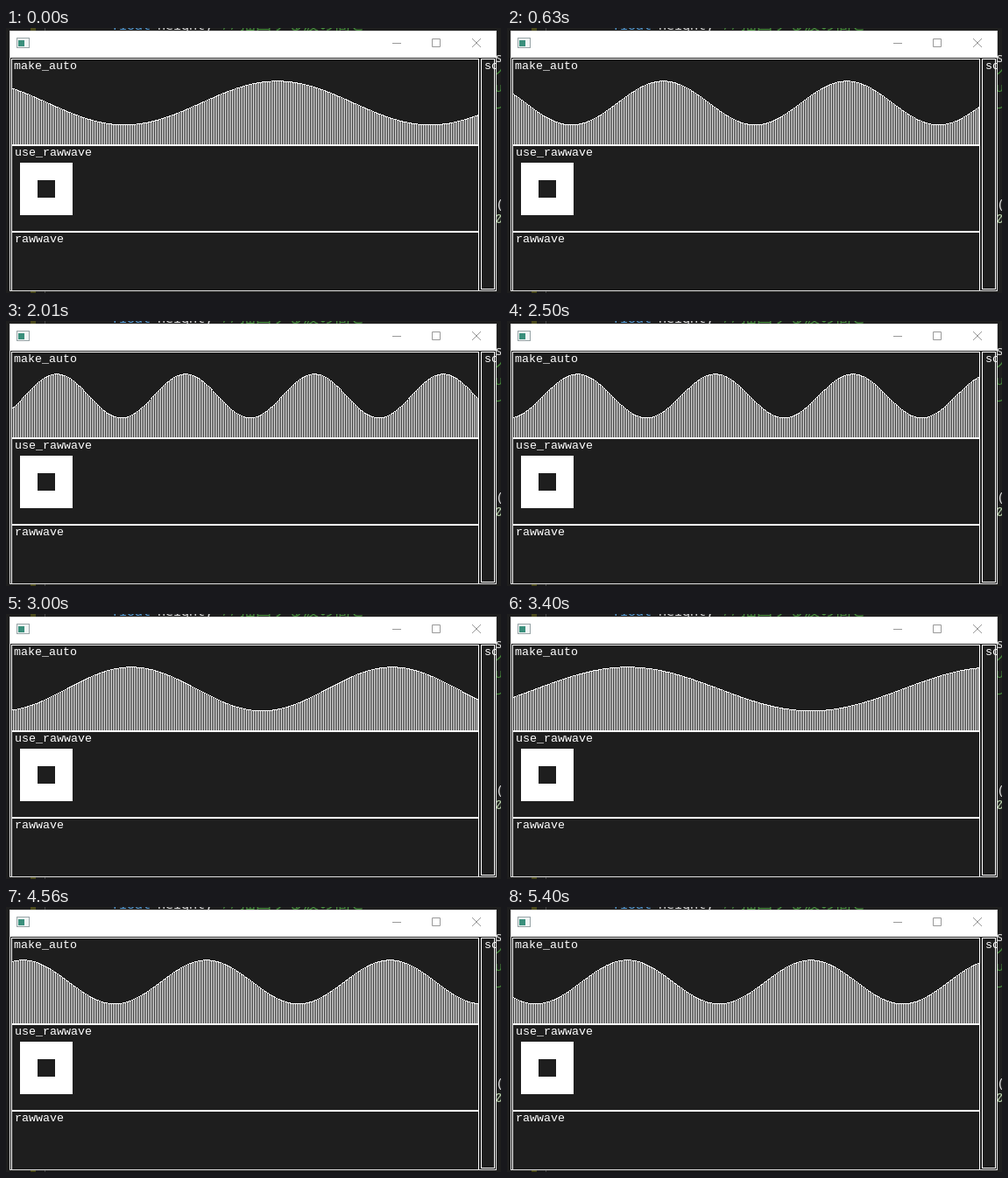
These frames come from a looping animation (565x303 px, 6.22 s). An HTML page with a canvas:

```html
<!DOCTYPE html>
<html lang="ja">
<head>
<meta charset="utf-8">
<title>Wave panels</title>
<style>
  html, body { margin: 0; width: 100%; height: 100%; overflow: hidden; background: #1e1e1e; }
  svg, canvas { position: absolute; left: 0; top: 0; display: block; }
  .code { font: 15px "Noto Sans Mono", "Noto Sans CJK JP", monospace; fill: #dcdcdc; white-space: pre; }
  .code .note { fill: #468a3c; }
  .label { font: 13.33px "Liberation Mono", monospace; fill: #fff; }
  .box { fill: none; stroke: #fff; shape-rendering: crispEdges; }
  .button { fill: none; stroke: #999; }
</style>
</head>
<body>
<svg width="565" height="303" viewBox="0 0 565 303">
  <!-- editor behind the window -->
  <rect width="565" height="303" fill="#1e1e1e"/>
  <path d="M28 0h6v3h-6zM28 301h6v2h-6z" fill="#4b4a1c"/>
  <path d="M44.5 0v3M44.5 301v2" stroke="#4a4a4a"/>
  <g class="code">
    <text x="120" y="2" fill="#569cd6">float</text>
    <text x="173" y="2">height;</text>
    <text class="note" x="246" y="2">//</text>
    <text class="note" x="267" y="2" style="font-size:18px">描画する波の高さ</text>
    <text x="558" y="39">s</text>
    <text class="note" x="552" y="55">ン</text>
    <text class="note" x="558" y="73">u</text>
    <text class="note" x="554" y="91">し</text>
    <text x="559" y="206">(</text>
    <text x="558" y="223" fill="#b5cea8">0</text>
  </g>

  <!-- window -->
  <rect x="4" y="3" width="556" height="298" fill="#1e1e1e"/>
  <rect x="4" y="3" width="556" height="31" fill="#fff"/>
  <rect x="4.5" y="3.5" width="555" height="297" fill="none" stroke="#dedede"/>
  <rect x="12.5" y="11.5" width="14" height="11" fill="#f0f4f4" stroke="#98a4a6"/>
  <rect x="14" y="14" width="7" height="7" fill="#3a8f7c"/>
  <path class="button" d="M441 17.5h10M486.5 12.5h9v9h-9zM532 12l10 10M542 12l-10 10"/>

  <!-- panels -->
  <g class="box">
    <path d="M6.5 300V35.5H539.5V300M542.5 35.5H557.5V298.5H542.5z"/>
    <path d="M7 133.5H540M7 233H540" stroke-width="2"/>
  </g>
  <path d="M16 154h60v60h-60zM36 174v20h20v-20z" fill="#fff" fill-rule="evenodd"/>
  <g class="label">
    <text x="9" y="47">make_auto</text>
    <text x="10" y="146">use_rawwave</text>
    <text x="10" y="245">rawwave</text>
    <svg x="543" y="35" width="17" height="20"><text x="3" y="12">sc</text></svg>
  </g>
</svg>
<canvas id="wave" width="565" height="134"></canvas>
<script>
const LOOP = 6220, STEP = 33;
const LEFT = 7, RIGHT = 539, BASE = 133;
const ctx = document.getElementById('wave').getContext('2d');

// The wave runs only in these spans and rests in between
const runs = [[200, 870], [1620, 3400], [4260, 4780]];

// Poses by running time; phase is taken at the left edge
const poses = [
  { at: 0, period: 20, phase: 3.87 },
  { at: 462, period: 12, phase: 9.84 },
  { at: 736, period: 8, phase: 14.28 },
  { at: 1594, period: 9, phase: 26.49 },
  { at: 2516, period: 24, phase: 38.08 },
  { at: 2846, period: 12, phase: 42.77 },
  { at: 3069, period: 12, phase: 46.31 }
];

const lerp = (a, b, u) => a + (b - a) * u;

// Running time in whole steps; each run opens with a step at once
function runningTime(t) {
  let sum = 0;
  for (const [start, end] of runs) {
    if (t >= end) sum += end - start + STEP;
    else if (t >= start) sum += (Math.floor((t - start) / STEP) + 1) * STEP;
  }
  return sum;
}

function poseAt(time) {
  const next = Math.max(1, poses.findIndex(p => p.at >= time));
  const a = poses[next - 1], b = poses[next];
  const u = (time - a.at) / (b.at - a.at);
  return { period: lerp(a.period, b.period, u), phase: lerp(a.phase, b.phase, u) };
}

function draw(t) {
  const { period, phase } = poseAt(runningTime(t));
  const k = 0.36 / period;
  ctx.clearRect(0, 0, 565, 134);
  ctx.fillStyle = '#fff';
  for (let x = LEFT; x < RIGHT; x++) {
    const y = Math.round(85.3 - 25 * Math.sin(k * (x - LEFT) - phase));
    ctx.fillRect(x, y, 1, x % 2 ? 1 : BASE - y);
  }
}

const began = performance.now();
function tick() {
  draw((performance.now() - began) % LOOP);
  requestAnimationFrame(tick);
}
tick();
</script>
</body>
</html>
```
